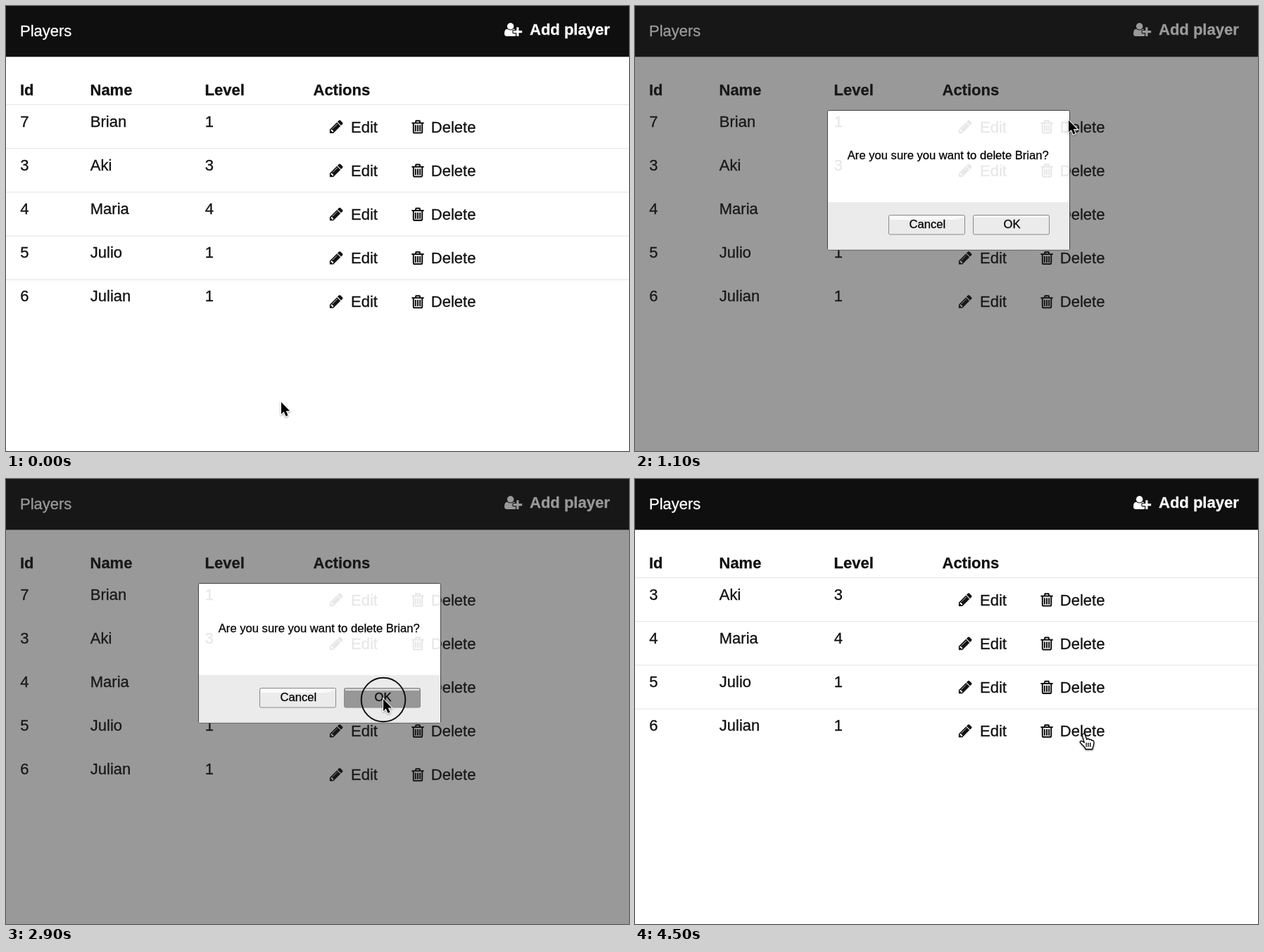
Write an HTML page that moves like this. It is 885x633 px and loops after 4900 ms.

```html
<!DOCTYPE html>
<html lang="en">
<head>
<meta charset="utf-8">
<title>Players</title>
<style>
  html, body { margin: 0; width: 100%; height: 100%; overflow: hidden; background: #fff; }
  svg { display: block; }
  text { font: 22px "Liberation Sans", Arial, sans-serif; fill: #111; stroke: #111; stroke-width: .3; }
  .bold, .bold text { font-weight: bold; }
  .nav text, .nav path { fill: #fff; stroke: #fff; }
  .nav path { stroke: none; }
  .small text { font-size: 16.6px; fill: #000; }
  .button { fill: #ebebeb; stroke: #8a8a8a; }
  #cursor { filter: drop-shadow(0 1px 1px #0006); }
  .modal .line { display: none; }
</style>
</head>
<body>
<svg id="stage" width="885" height="633" viewBox="0 0 885 633">
  <defs>
    <clipPath id="panel"><rect x="274" y="149" width="343" height="130"/></clipPath>
    <path id="pencil" transform="scale(.01228)" fill="#111" d="M491 1536l91-91-235-235-91 91v107h128v128h107zm523-928q0-22-22-22-10 0-17 7l-542 542q-7 7-7 17 0 22 22 22 10 0 17-7l542-542q7-7 7-17zm-54-192l416 416-832 832h-416v-416zm683 96q0 53-37 90l-166 166-416-416 166-165q36-38 90-38 53 0 91 38l235 234q37 39 37 91z"/>
    <path id="trash" transform="scale(.01228)" fill="none" stroke="#111" stroke-width="165" d="M192 448H1600M390 448v948q0 190 96 190h820q96 0 96-190v-948M620 430l72-238h408l72 238M640 670v740M896 670v740M1152 670v740"/>
  </defs>

  <g class="nav">
    <rect width="885" height="72.3" fill="#0f0f0f"/>
    <text x="20" y="43">Players</text>
    <path transform="translate(708 22.5) scale(.01228)" d="M704 896a384 384 0 1 1 1 0zM1664 1024h384v256h-384v384h-256v-384h-384v-256h384v-384h256zM928 1248q0 52 38 90t90 38h256v238q-68 50-171 50h-874q-121 0-194-69t-73-190q0-53 3.5-103.5t14-109 26.5-108.5 43-97.5 62-81 85.5-53.5 111.5-20q19 0 39 17 79 61 154.5 91.5t164.5 30.5 164.5-30.5 154.5-91.5q20-17 39-17 132 0 217 96h-223q-52 0-90 38t-38 90v192z"/>
    <text class="bold" x="744" y="41">Add player</text>
  </g>
  <g class="bold">
    <text x="20" y="126.5">Id</text>
    <text x="119.5" y="126.5">Name</text>
    <text x="282.5" y="126.5">Level</text>
    <text x="436.5" y="126.5">Actions</text>
  </g>
  <g id="rows"></g>

  <g id="dialog">
    <rect width="885" height="633" fill="#212121" opacity=".458"/>
    <rect x="273.5" y="148.5" width="344" height="198.5" rx="2" fill="#fff" stroke="#444"/>
    <use href="#rows" clip-path="url(#panel)" opacity=".1"/>
    <path d="M274 279h343v67.5h-343z" fill="#ebebeb"/>
    <rect class="button" x="360.5" y="297.5" width="108" height="27.5" rx="2"/>
    <path d="M362 298.5h105v2.5l-14 3h-91z" fill="#fafafa"/>
    <rect class="button" id="ok" x="480.5" y="297.5" width="108" height="27.5" rx="2"/>
    <path id="gloss" d="M482 298.5h105v2.5h-105z" fill="#fafafa"/>
    <g class="small">
      <text x="301.8" y="218">Are you sure you want to delete Brian?</text>
      <text x="389.5" y="316">Cancel</text>
      <text x="523.5" y="316">OK</text>
    </g>
  </g>

  <g id="cursor">
    <path id="arrow" d="M0-.5V16.5L3.8 13L6.5 19.6L9.6 18.3L6.8 12H12Z" stroke="#fff" stroke-width="2" paint-order="stroke"/>
    <g id="hand" stroke="#000" stroke-width="1.3" stroke-linejoin="round">
      <path fill="#fff" d="M.8 13L-2.2 3.2C-3 .4.8-.6 1.9 2L4.2 8.5C5.2 7 7.2 7.2 7.8 9C9 7.8 10.8 8.3 11.2 10C13 9.2 14.3 10.5 14.5 12.5C14.8 16 13 18 12.4 22.5H2.8C2 19-2 17-4.8 13.2C-6.2 11-3.6 9.8-2 11.2Z"/>
      <path d="M3.6 13v6M6.4 13v6M9.2 13v6"/>
    </g>
  </g>
  <circle id="ring" fill="none" stroke="#111" stroke-width="2"/>
</svg>
<script>
const $ = id => document.getElementById(id);
const show = (id, on) => $(id).style.display = on ? "" : "none";

const LOOP = 4900, STEP = 100, ROW = 62.2;
const OPENED = 1100, DELETED = 3000;
const players = [[7, "Brian", 1], [3, "Aki", 3], [4, "Maria", 4], [5, "Julio", 1], [6, "Julian", 1]];
// start, end, from x, from y, to x, to y
const moves = [
  [0, 820, 391, 564, 616, 163],
  [1200, 1800, 616, 163, 540, 307],
  [1900, 2400, 540, 307, 536, 313.5],
  [3800, 4400, 536, 313.5, 637.5, 362]
];
// time: centre x, centre y, radius
const clicks = { 1000: [616, 163, 42], 2900: [536, 314, 31.3] };

const rowMarkup = ([id, name, level], i) => `<g transform="translate(0 ${i * ROW})">
  <path class="line" d="M0 140.5H885" stroke="#e2e2e2"/>
  <text x="20.3" y="171.5">${id}</text><text x="119.8" y="171.5">${name}</text><text x="282.8" y="171.5">${level}</text>
  <use href="#pencil" transform="translate(458.3 160.5)"/><text x="490" y="179.5">Edit</text>
  <use href="#trash" transform="translate(574 161)"/><text x="603.8" y="179.5">Delete</text></g>`;

const ease = p => p < .5 ? 4 * p ** 3 : 1 - 4 * (1 - p) ** 3;

function cursorAt(t) {
  const [start, end, x0, y0, x1, y1] = moves.findLast(m => m[0] <= t);
  const p = ease(Math.min(1, (t - start) / (end - start)));
  return [x0 + (x1 - x0) * p, y0 + (y1 - y0) * p];
}

function overLink(x, y, count) {
  const row = Math.round((y - 172) / ROW);
  return x > 438 && x < 690 && row >= 0 && row < count && Math.abs(y - 172 - row * ROW) < 21;
}

let shownRows;
function draw(t) {
  const modal = t >= OPENED && t < DELETED;
  const list = t < DELETED ? players : players.slice(1);
  if (shownRows !== list.length) {
    $("rows").innerHTML = list.map(rowMarkup).join("");
    shownRows = list.length;
  }
  $("stage").classList.toggle("modal", modal);
  show("dialog", modal);

  const [x, y] = cursorAt(t);
  const hand = !modal && overLink(x, y, list.length);
  show("hand", hand);
  show("arrow", !hand);
  $("cursor").setAttribute("transform", `translate(${x} ${y})`);

  const click = clicks[t];
  show("ring", click);
  if (click) ["cx", "cy", "r"].forEach((name, i) => $("ring").setAttribute(name, click[i]));

  const hover = x > 480 && x < 589 && y > 297 && y < 325;
  $("ok").style.fill = click ? "#979797" : hover ? "#fff" : "";
  $("gloss").style.fill = click ? "#ddd" : "";
}

function tick() {
  draw(Math.floor(performance.now() % LOOP / STEP) * STEP);
  requestAnimationFrame(tick);
}
tick();
</script>
</body>
</html>
```
